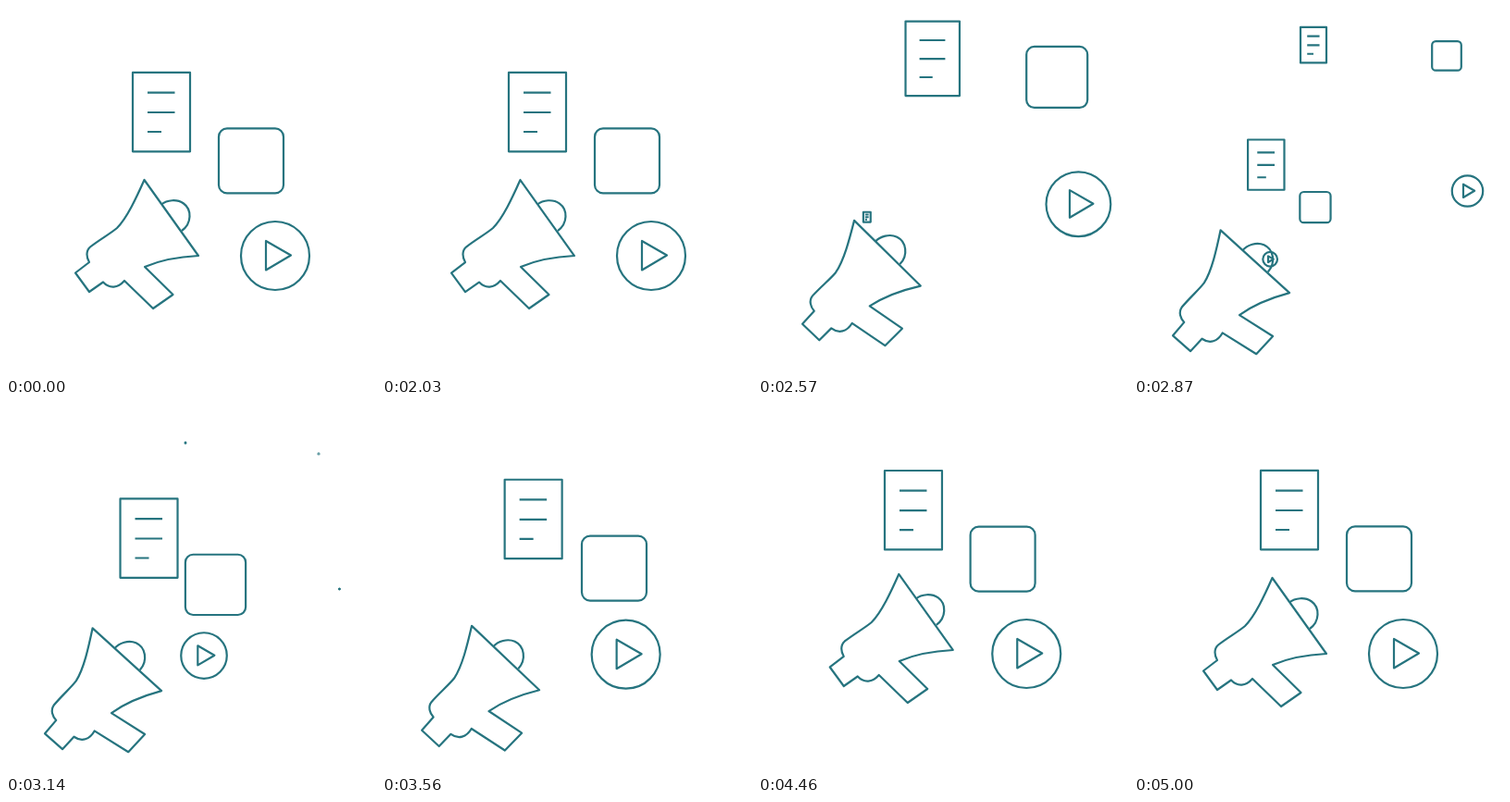
Animation, 400 px wide and 400 px high, one loop 5120 ms. Source, as an HTML page:

```html
<!DOCTYPE html>
<html lang="en">
<head>
<meta charset="utf-8">
<title>Megaphone</title>
<style>
  html, body { margin: 0; width: 100%; height: 100%; overflow: hidden; background: #fff; }
  svg { display: block; width: 100vw; height: 100vh; }
  path, rect, circle {
    fill: none;
    stroke: #26747f;
    stroke-width: 2.2;
    stroke-linejoin: round;
    vector-effect: non-scaling-stroke;
  }
</style>
</head>
<body>
<svg viewBox="0 0 400 400">
  <defs>
    <g id="page">
      <rect x="-31" y="-42.7" width="62" height="85.4"/>
      <path d="M-15 -21H14.5M-15 .4H14.5M-15 21.4H0"/>
    </g>
    <g id="tile">
      <rect x="-35" y="-35" width="70" height="70" rx="9"/>
    </g>
    <g id="play">
      <circle r="37"/>
      <path d="M-10 -16V15.5L17 -.5Z"/>
    </g>
  </defs>
  <g id="horn">
    <path d="M149.5 188C141 207 131 229 120 240C113 246 102 252 91 260.5C86 265 87 272 90 277L75 288.5L90 309L105 298.5C112 306 121 305 128 297L159 327L180.5 312L150 282C166 275 188 271 208 270Z"/>
    <path d="M168 214.5C174 209.5 185 208.5 192 213.5C201 220 201 235 190 243"/>
  </g>
  <g id="icons"></g>
</svg>
<script>
const LOOP = 5120, START = 2030, STEP = 30;
const horn = document.getElementById('horn');
const layer = document.getElementById('icons');

const clamp = v => Math.min(1, Math.max(0, v));
const ramp = (t, from, to) => clamp((t - from) / (to - from));
const smooth = u => u * u * (3 - 2 * u);
// Fast launch with a long, soft landing: 1 at the start, 0 at the end
const settle = u => (1 - u ** .8) ** 3.45;

// Smooth curve through [time, value] keys, flat at both ends
function track(t, keys) {
  const last = keys.length - 1;
  if (t <= keys[0][0]) return keys[0][1];
  if (t >= keys[last][0]) return keys[last][1];
  const slope = i => i === 0 || i === last ? 0 :
    (keys[i + 1][1] - keys[i - 1][1]) / (keys[i + 1][0] - keys[i - 1][0]);
  const i = keys.findIndex(k => k[0] > t) - 1;
  const [t0, a] = keys[i], [t1, b] = keys[i + 1];
  const d = t1 - t0, u = (t - t0) / d, w = 1 - u;
  return a * (1 + 2 * u) * w * w + b * u * u * (3 - 2 * u) +
    d * u * w * (slope(i) * w - slope(i + 1) * u);
}

const SHIFT_BACK = [[3330, 0], [3560, .042], [4040, .59], [4160, .91], [4480, 1.08], [4700, 1.06], [5000, 1]];
const TURN_BACK = [[3330, 0], [3560, .1], [4040, .84], [4260, 1]];

// rest: home position, out: drift while vanishing, from: birthplace at the horn
const icons = [
  { id: 'page', rest: [168, 114.6], out: [26, -72.5], from: [104.8, 257.6], start: 2495, end: 4800 },
  { id: 'tile', rest: [265, 167.4], out: [73, -113.5], from: [128.8, 266.4], start: 2590, end: 5000 },
  { id: 'play', rest: [291, 270], out: [69.5, -70], from: [85, 275.4], start: 2745, end: 5000 }
];

function copy(id) {
  const use = document.createElementNS('http://www.w3.org/2000/svg', 'use');
  use.setAttribute('href', '#' + id);
  return layer.appendChild(use);
}
for (const icon of icons) {
  icon.leaving = copy(icon.id);
  icon.arriving = copy(icon.id);
}

function place(el, x, y, scale) {
  el.style.display = scale > 0 ? '' : 'none';
  if (scale > 0) el.setAttribute('transform', `translate(${x} ${y}) scale(${scale})`);
}

function draw(t) {
  const recoil = smooth(ramp(t, 2020, 2780));
  const shift = recoil - track(t, SHIFT_BACK);
  const turn = recoil - track(t, TURN_BACK);
  horn.setAttribute('transform',
    `translate(${-36.7 * shift} ${54 * shift}) rotate(${-12.2 * turn} 141.5 278)`);

  const go = smooth(ramp(t, 2030, 2790));
  for (const { rest, out, from, start, end, leaving, arriving } of icons) {
    place(leaving, rest[0] + out[0] * go, rest[1] + out[1] * go, 1 - ramp(t, 2535, 3146));
    const left = settle(ramp(t, start, end));
    place(arriving, rest[0] + (from[0] - rest[0]) * left, rest[1] + (from[1] - rest[1]) * left,
      ramp(t, start, start + 590));
  }
}

function frame() {
  const t = performance.now() % LOOP;
  draw(t < START ? 0 : START + Math.floor((t - START) / STEP) * STEP);
  requestAnimationFrame(frame);
}
frame();
</script>
</body>
</html>
```
